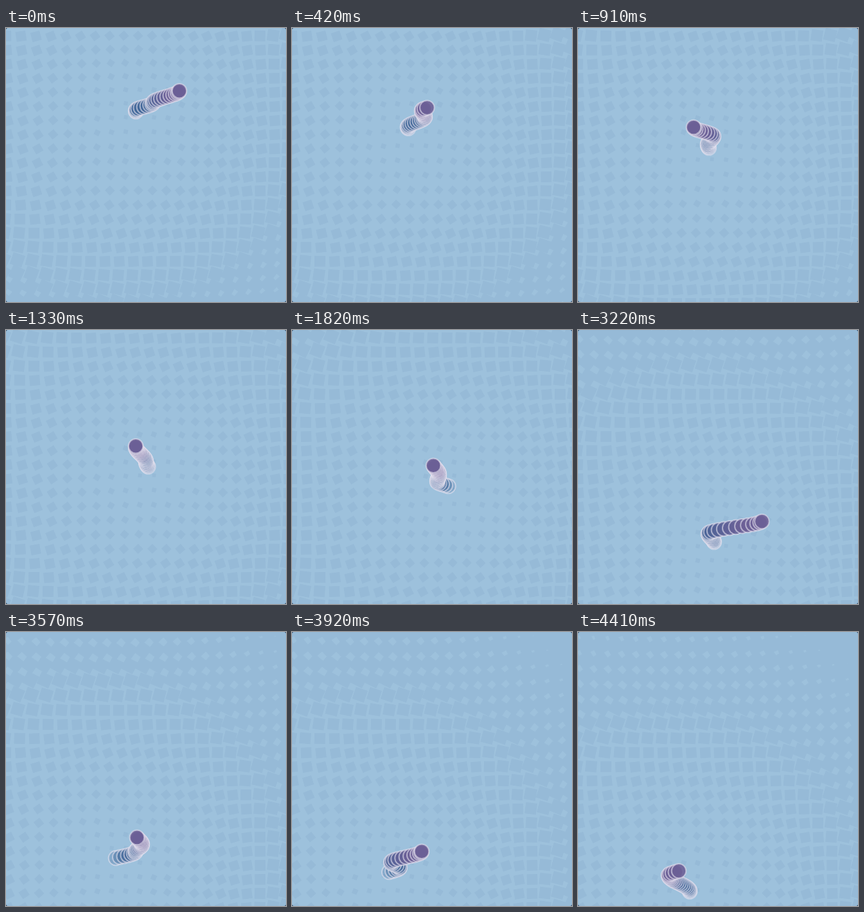
An HTML page with a canvas that plays this animation: 436x428 px, repeating every 4.48 s.

```html
<!DOCTYPE html>
<html lang="en">
<head>
<meta charset="utf-8">
<title>Drifting trail</title>
<style>
  html, body { margin: 0; width: 100%; height: 100%; overflow: hidden; background: #26384f; }
  canvas { display: block; border-radius: 3px; }
</style>
</head>
<body>
<canvas id="stage" width="436" height="428"></canvas>
<script>
const ctx = document.getElementById('stage').getContext('2d');
const W = 436, H = 428;
const STEP = 70, STEPS = 64;
const TOP = 98.3, SPEED = 4.365;     // trail's upper end and its descent per step
const DISCS = 23, LENGTH = 32.2;
const PITCH = 22;

// Points where the sideways drift rests or turns: [y, x]
const turns = [
  [98, 270], [117, 229], [129, 202], [139, 207], [155, 180], [169, 211], [182, 202],
  [206, 218], [226, 229], [237, 226], [247, 248], [256, 241], [280, 306], [298, 287],
  [318, 203], [332, 212], [343, 202], [360, 154], [368, 168], [380, 141], [405, 174]
];

const clamp = v => Math.min(1, Math.max(0, v));
const ease = t => (1 - Math.cos(Math.PI * clamp(t))) / 2;
const mix = (a, b, t) => a.map((v, i) => Math.round(v + (b[i] - v) * t));

function driftX(y) {
  const next = turns.findIndex(p => p[0] > y);
  const i = next < 0 ? turns.length - 1 : Math.max(1, next);
  const [y0, x0] = turns[i - 1], [y1, x1] = turns[i];
  return x0 + (x1 - x0) * ease((y - y0) / (y1 - y0));
}

// Squares hang by one corner; distance from the focus sets size and turn.
function drawField(fx, fy) {
  ctx.fillStyle = '#9dc1dc';
  ctx.fillRect(0, 0, W, H);
  ctx.beginPath();
  for (let y = 4 - 2 * PITCH; y < H + 2 * PITCH; y += PITCH) {
    for (let x = 8 - 2 * PITCH; x < W + 2 * PITCH; x += PITCH) {
      const d = Math.hypot(x - fx, y - fy);
      const size = 5 + d / 20, turn = d / 150;
      const c = size * Math.cos(turn), s = size * Math.sin(turn);
      ctx.moveTo(x, y);
      ctx.lineTo(x + c, y + s);
      ctx.lineTo(x + c - s, y + s + c);
      ctx.lineTo(x - s, y + c);
      ctx.closePath();
    }
  }
  ctx.fillStyle = '#96bad7';
  ctx.fill();
}

// The leading disc is faint and blue; older ones lie on top, solid and purple.
function drawTrail(top) {
  ctx.lineWidth = 2;
  ctx.strokeStyle = 'rgba(230,226,240,0.6)';
  for (let n = DISCS - 1; n >= 0; n--) {
    const age = n / (DISCS - 1), y = top + age * LENGTH;
    const color = mix([108, 95, 150], [64, 102, 152], clamp((age - 0.2) / 0.4));
    ctx.beginPath();
    ctx.arc(driftX(y), y, 11.3, 0, 2 * Math.PI);
    ctx.fillStyle = `rgba(${color},${Math.min(0.9, 0.25 + (1 - age) * 3)})`;
    ctx.fill();
    ctx.stroke();
  }
}

function draw(time) {
  const top = TOP + SPEED * (Math.floor(time / STEP) % STEPS);
  const end = top + LENGTH;
  drawField(driftX(end), end);
  drawTrail(top);
}

const start = performance.now();
function tick() {
  draw(performance.now() - start);
  requestAnimationFrame(tick);
}
tick();
</script>
</body>
</html>
```
